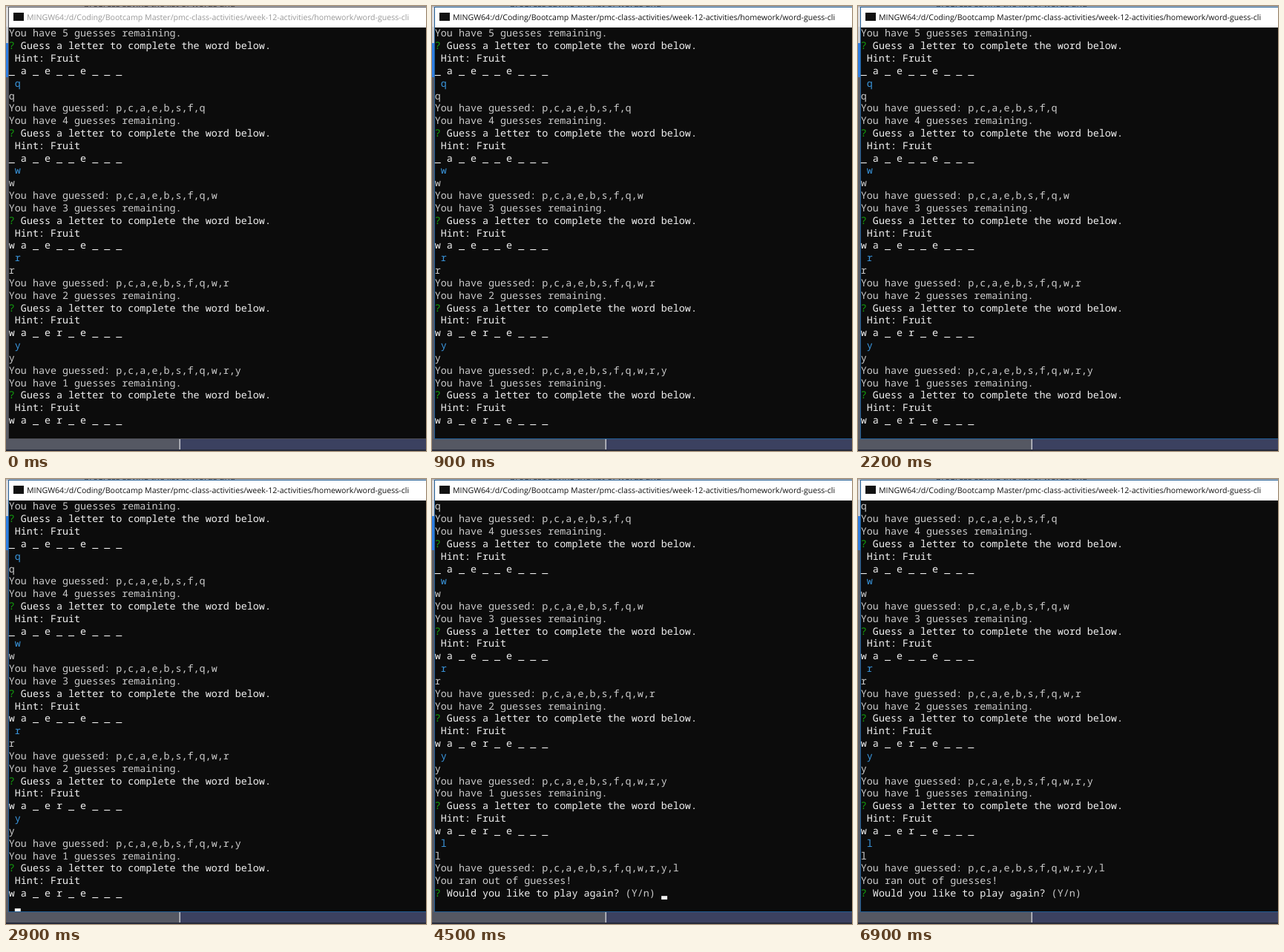
An HTML page for the animation above (7100 ms loop, 566 px wide and 600 px high).

```html
<!DOCTYPE html>
<html lang="en">
<head>
<meta charset="utf-8">
<title>Word guess</title>
<style>
  html, body { margin: 0; width: 100%; height: 100%; overflow: hidden; background: #0c0c0c; }
  svg { display: block; width: 566px; height: 600px; }
  text { white-space: pre; text-rendering: geometricPrecision; }
  .ui { font-family: "Open Sans", "Noto Sans", sans-serif; }
  #rows { font: 500 13.39px "Noto Sans Mono", "DejaVu Sans Mono", monospace; }
</style>
</head>
<body>
<svg viewBox="0 0 566 600">
  <defs>
    <clipPath id="pane"><rect x="3" y="29" width="563" height="554"/></clipPath>
    <clipPath id="strip"><rect width="566" height="2"/></clipPath>
  </defs>

  <!-- what shows around the window -->
  <rect width="566" height="600" fill="#5b5d66"/>
  <rect width="566" height="2" fill="#b9bac0"/>
  <text class="ui" x="105" y="1" font-size="12" fill="#55565c" clip-path="url(#strip)">progress saving the list of words and</text>
  <rect y="2" width="4" height="26" fill="#dcdde0"/>
  <rect y="28" width="3" height="22" fill="#c9ccd2"/>
  <rect y="50" width="3" height="46" fill="#2f7de0"/>
  <rect y="584" width="234" height="16" fill="#555863"/>
  <rect x="234" y="584" width="332" height="16" fill="#3b4160"/>
  <rect x="233.5" y="584" width="1.5" height="14" fill="#c4c6cc"/>
  <rect y="598" width="566" height="2" fill="#262a3a"/>

  <!-- window -->
  <rect id="frame" x="3" y="1" width="563" height="583"/>
  <rect x="4" y="2" width="562" height="27" fill="#fff"/>
  <rect x="4" y="29" width="562" height="554" fill="#0c0c0c"/>
  <rect x="10" y="9" width="14" height="11" fill="#111"/>
  <text id="title" class="ui" x="28" y="19.3" font-size="10.6">MINGW64:/d/Coding/Bootcamp Master/pmc-class-activities/week-12-activities/homework/word-guess-cli</text>
  <g clip-path="url(#pane)">
    <g id="rows"></g>
    <rect id="caret" width="8" height="4.8" fill="#f2f2f2"/>
  </g>
</svg>

<script>
const LOOP = 7100, STEP = 100;
const LEFT = 3.8, TOP = 41.4, COL = 8.034, ROW = 16.825;
const GREY = '#cccccc', WHITE = '#f2f2f2', GREEN = '#13a10e', BLUE = '#3a96dd';
const PROMPT = 29, INPUT = 32, SCROLL = 5;
const FOCUS = 500, CLEAR = 1800, REDRAW = 1900, TYPE = 3700, ENTER = 4500;
const BLINK = 530, BLINK_OFF = 4700;

const NS = 'http://www.w3.org/2000/svg';
const byId = id => document.getElementById(id);
const group = byId('rows'), caret = byId('caret');
const rows = [];

// Each part is [text, colour].
function addRow(...parts) {
  const line = document.createElementNS(NS, 'text');
  line.setAttribute('x', LEFT);
  line.setAttribute('y', TOP + rows.length * ROW);
  for (const [str, colour] of parts) {
    const span = document.createElementNS(NS, 'tspan');
    span.textContent = str;
    span.setAttribute('fill', colour);
    line.append(span);
  }
  group.append(line);
  rows.push(line);
}

function addGame() {
  const word = 'watermelon';
  const guessed = [...'pcaebsf'];
  let left = 5;
  for (const letter of 'qwryl') {
    addRow([`You have ${left--} guesses remaining.`, GREY]);
    addRow(['?', GREEN], [' Guess a letter to complete the word below.', WHITE]);
    addRow([' Hint: Fruit', WHITE]);
    addRow([[...word].map(c => guessed.includes(c) ? c : '_').join(' '), WHITE]);
    addRow([' ' + letter, BLUE]);
    addRow([letter, GREY]);
    guessed.push(letter);
    addRow(['You have guessed: ' + guessed.join(','), GREY]);
  }
  addRow(['You ran out of guesses!', GREY]);
  addRow(['?', GREEN], [' Would you like to play again? ', WHITE], ['(Y/n) ', GREY]);
}

function caretOn(t) {
  if (t < CLEAR) return false;
  if (t < 2200) return true;
  if (t < TYPE) return t >= 2700 && t < 3200;
  if (t < ENTER) return t < 4200 || t >= 4400;
  return t < BLINK_OFF || Math.floor((t - BLINK_OFF) / BLINK) % 2 === 1;
}

function caretCell(t) {
  if (t < REDRAW) return [0, PROMPT];
  if (t < TYPE) return [1, INPUT];
  if (t < ENTER) return [2, INPUT];
  return [38, rows.length - 1 - SCROLL];
}

function draw(time) {
  const t = Math.floor(time % LOOP / STEP) * STEP;
  const active = t >= FOCUS;
  const done = t >= ENTER;
  const cleared = t >= CLEAR && t < REDRAW;
  const shown = done ? rows.length : cleared ? PROMPT : t >= TYPE ? INPUT + 1 : INPUT;

  byId('title').setAttribute('fill', active ? '#111' : '#999');
  byId('frame').setAttribute('fill', active ? '#1f5c94' : '#4a4b52');
  rows.forEach((line, i) => line.style.display = i < shown ? '' : 'none');
  rows[INPUT].firstChild.setAttribute('fill', done ? BLUE : GREY);
  group.setAttribute('transform', `translate(0 ${done ? -SCROLL * ROW : 0})`);

  const [col, row] = caretCell(t);
  caret.setAttribute('x', LEFT + col * COL);
  caret.setAttribute('y', TOP + row * ROW - 0.8);
  caret.style.display = caretOn(t) ? '' : 'none';
}

addGame();
const start = performance.now();
function tick() {
  draw(performance.now() - start);
  requestAnimationFrame(tick);
}
tick();
</script>
</body>
</html>
```
